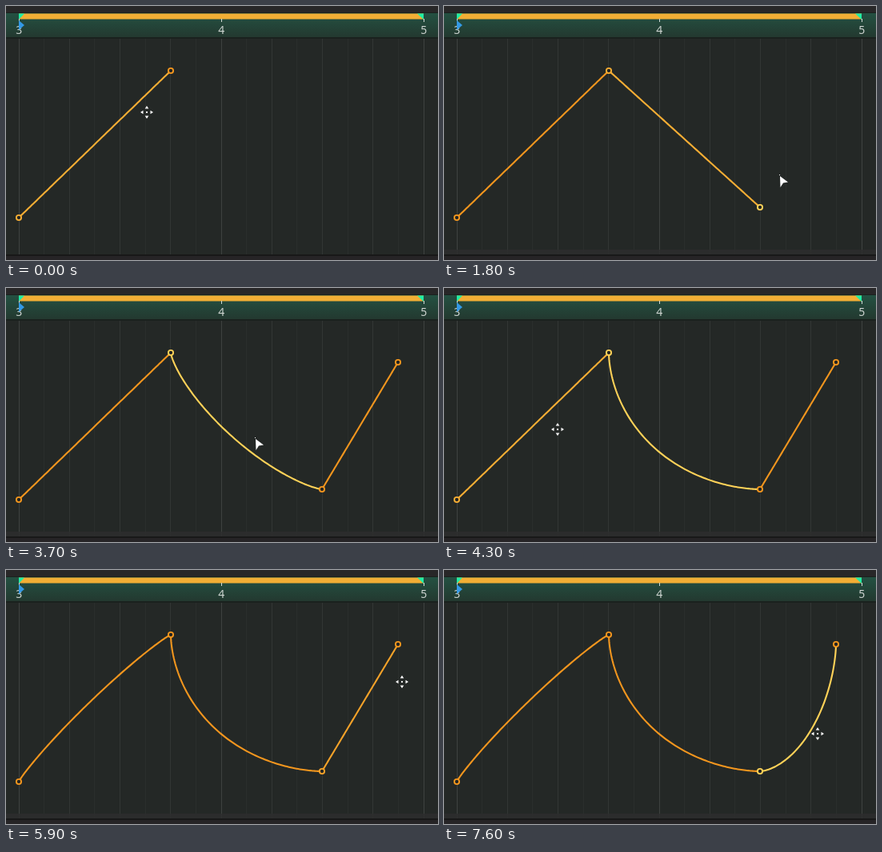
Write an HTML page with a canvas that moves like this. It is 540 by 318 pixels and loops after 7700 ms.

```html
<!DOCTYPE html>
<html lang="en">
<head>
<meta charset="utf-8">
<title>Automation curve editor</title>
<style>
  html, body { margin: 0; width: 100%; height: 100%; overflow: hidden; background: #242826; }
  canvas { display: block; width: 540px; height: 318px; }
</style>
</head>
<body>
<canvas id="stage" width="540" height="318"></canvas>
<script>
const ctx = document.getElementById('stage').getContext('2d');
const LOOP = 7700, STEP = 100;
const LEFT = 16, BEAT = 253;
const FIRST_CLICK = 1200;

const points = [[16, 265], [206, 81], [395, 252], [490, 93]];

// A segment is bent while it is dragged; swing is a passing extra bend.
const segments = [
  { grab: 4400, release: 5500, bendTime: 1100, bend: .1, swing: .27 },
  { grab: 3400, release: 4300, bendTime: 500, bend: .42, swing: 0 },
  { grab: 6200, release: LOOP, bendTime: 500, bend: .38, swing: 0 }
];

// Cursor moves: start time, end time, destination.
const cursorHome = [176, 133];
const cursorMoves = [
  [200, 900, points[2]],
  [1500, 1800, [419, 211]],
  [1800, 2400, points[3]],
  [2700, 3200, [311, 161]],
  [3400, 3900, [311, 205]],
  [3900, 4300, [142, 177]],
  [4400, 4800, [137, 40]],
  [4900, 5200, [136, 158]],
  [5400, 5900, [495, 140]],
  [5900, 6200, [460, 146]],
  [6200, 6500, [461, 190]],
  [6500, 7200, [467, 205]]
];

const tones = { normal: [243, 150, 30], hovered: [247, 174, 52], selected: [255, 210, 88] };

const progress = (t, from, to) => Math.min(1, Math.max(0, (t - from) / (to - from)));
const mix = (a, b, k) => a.map((v, i) => v + (b[i] - v) * k);
const birth = i => i * FIRST_CLICK;

// Tone levels: 0 normal, 1 hovered, 2 selected.
function segmentTone(i, t) {
  if (t < birth(i)) return 0;
  const { grab, release } = segments[i];
  const fresh = 1 - progress(t, birth(i) + 600, birth(i) + 800);
  const held = progress(t, grab - 400, grab - 200) + progress(t, grab, grab + 200);
  return Math.max(fresh, held * (1 - progress(t, release, release + 400)));
}

function pointTone(i, t) {
  const ownSegment = i < segments.length ? segmentTone(i, t) : 0;
  const placed = birth(i - 1);
  const justPlaced = placed > 0 ? 2 * (1 - progress(t, placed + 900, placed + 1200)) : 0;
  return Math.max(ownSegment, justPlaced);
}

function toneColor(level) {
  const color = level < 1
    ? mix(tones.normal, tones.hovered, level)
    : mix(tones.hovered, tones.selected, level - 1);
  return `rgb(${color.map(Math.round)})`;
}

function rect(color, x, y, w, h) {
  ctx.fillStyle = color;
  ctx.fillRect(x, y, w, h);
}

function polygon(color, corners) {
  ctx.beginPath();
  corners.forEach(([x, y]) => ctx.lineTo(x, y));
  ctx.closePath();
  ctx.fillStyle = color;
  ctx.fill();
}

function drawGrid(t) {
  rect('#242826', 0, 40, 540, 271);
  for (let i = 0; i <= 16; i++) {
    const color = i % 8 === 0 ? '#3e4240' : i % 2 === 0 ? '#323634' : '#2a2e2c';
    rect(color, Math.floor(LEFT + i * BEAT / 8), 41, 1, 270);
  }
  if (t >= 200) rect('rgba(46,46,46,.8)', 0, 305, 540, 6);
  rect('#181818', 0, 311, 540, 2);
  rect('#262426', 0, 313, 540, 5);
}

function drawRuler() {
  rect('#282728', 0, 0, 540, 9);
  const green = ctx.createLinearGradient(0, 9, 0, 40);
  green.addColorStop(0, '#245142');
  green.addColorStop(1, '#23382f');
  rect(green, 0, 9, 540, 31);
  rect('#1a211e', 0, 8, 540, 1);
  rect('#1a211e', 0, 39, 540, 2);
  rect('#f2ae35', LEFT, 9.5, 2 * BEAT, 7);
  polygon('#20eda5', [[16, 9.5], [23, 9.5], [16, 17]]);
  polygon('#20eda5', [[522, 9.5], [514, 9.5], [522, 17]]);

  ctx.font = '14px "Noto Sans", sans-serif';
  ctx.textAlign = 'center';
  for (let bar = 0; bar < 3; bar++) {
    const x = LEFT + bar * BEAT;
    rect('#d4dcd8', x, 16, 1, 4);
    ctx.fillStyle = '#cdd4d0';
    ctx.fillText(String(bar + 3), x + .3, 35);
  }
  polygon('#3399e6', [[16, 18], [23, 24], [16, 30]]);
}

function drawSegment(i, t) {
  const { grab, bendTime, bend, swing } = segments[i];
  const [x0, y0] = points[i], [x1, y1] = points[i + 1];
  const k = progress(t, grab, grab + bendTime);
  const n = 1 - bend * k - swing * Math.sin(Math.PI * k) ** 2;
  const superellipse = u => 1 - (1 - u ** n) ** (1 / n);
  ctx.beginPath();
  for (let s = 0; s <= 100; s++) {
    // Denser samples near both ends, where the curve is steepest.
    const u = (1 - Math.cos(Math.PI * s / 100)) / 2;
    const v = i === 2 ? 1 - superellipse(1 - u) : superellipse(u);
    ctx.lineTo(x0 + (x1 - x0) * u, y0 + (y1 - y0) * v);
  }
  ctx.strokeStyle = toneColor(segmentTone(i, t));
  ctx.lineWidth = 2.1;
  ctx.lineJoin = 'round';
  ctx.stroke();
}

function drawPoint(i, t) {
  ctx.beginPath();
  ctx.arc(...points[i], 3.1, 0, 2 * Math.PI);
  ctx.fillStyle = '#222423';
  ctx.fill();
  ctx.strokeStyle = toneColor(pointTone(i, t));
  ctx.lineWidth = 1.9;
  ctx.stroke();
}

function drawCursor(t) {
  const place = cursorMoves.reduce(
    (at, [from, to, target]) => mix(at, target, progress(t, from, to)), cursorHome);
  const hovering = (t + 500) % LOOP < 800 ||
    segments.some(({ grab }) => t >= grab - 300 && t < grab);
  ctx.save();
  ctx.translate(...place.map(Math.round));
  if (hovering) {
    rect('#eee', -1, -1, 2, 2);
    for (let side = 0; side < 4; side++) {
      polygon('#fff', [[8, 0], [4.5, -2.3], [4.5, 2.3]]);
      ctx.rotate(Math.PI / 2);
    }
  } else {
    rect('#fff', 0, 0, 1, 1);
    polygon('#fff', [[1, 2], [11, 9.5], [5, 10.5], [1.5, 16]]);
  }
  ctx.restore();
}

function draw(t) {
  drawGrid(t);
  drawRuler();
  segments.forEach((_, i) => { if (t >= birth(i)) drawSegment(i, t); });
  points.forEach((_, i) => { if (t >= birth(i - 1)) drawPoint(i, t); });
  drawCursor(t);
}

const start = performance.now();
function tick() {
  const elapsed = (performance.now() - start) % LOOP;
  draw(Math.floor(elapsed / STEP) * STEP);
  requestAnimationFrame(tick);
}
tick();
</script>
</body>
</html>
```
